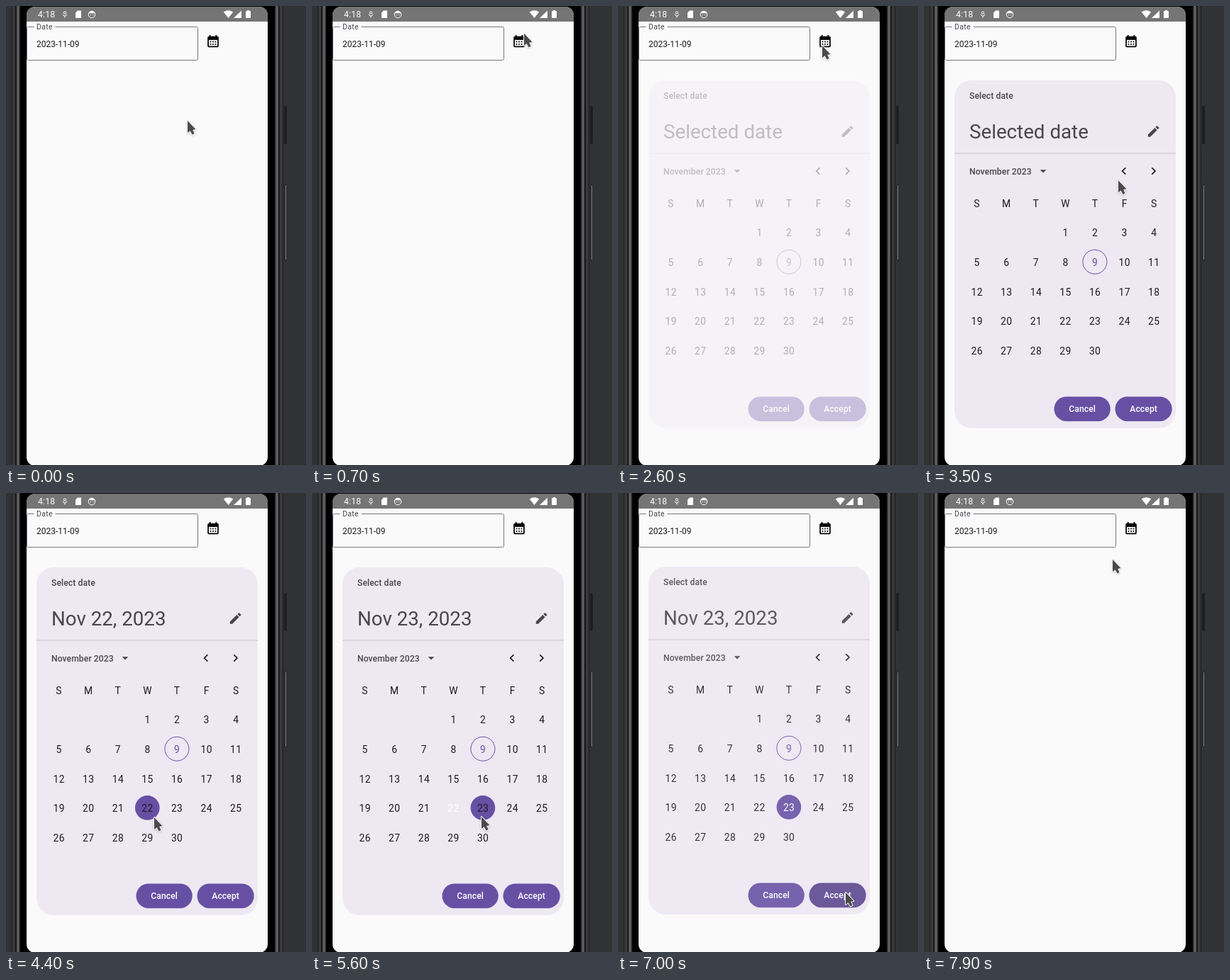
An HTML page with a canvas that plays this animation: 423x648 px, repeating every 8 s.

```html
<!DOCTYPE html>
<html lang="en">
<head>
<meta charset="utf-8">
<title>Date picker</title>
<style>
html, body { margin: 0; width: 100%; height: 100%; overflow: hidden; background: #303234; }
canvas { display: block; width: 423px; height: 648px; }
</style>
</head>
<body>
<canvas id="stage" width="423" height="648"></canvas>
<script>
const W = 423, H = 648, LOOP = 8000, STEP = 100;
const DP = 0.8667, CELL = 48 * DP;
const PURPLE = '#6750a4', INK = '#1c1b1f', MUTED = '#49454f', PAPER = '#fafafa';
const TAP = { open: 1700, first: 4400, second: 5600, accept: 6800 };

const stage = document.getElementById('stage').getContext('2d');
const layer = document.createElement('canvas');
layer.width = W;
layer.height = H;
const sheet = layer.getContext('2d');

const ARROW = new Path2D('M0 0V17L3.6 14.2 6.6 19.6 9.6 18 7.2 13 11.4 12Z');
const PENCIL = new Path2D('M3 17.2V21H6.8L17.8 9.9 14.1 6.2ZM20.7 7a1 1 0 0 0 0-1.4L18.4 3.3a1 1 0 0 0-1.4 0L15.1 5.1 18.9 8.9Z');

const clamp = k => Math.min(1, Math.max(0, k));
const smooth = k => k * k * (3 - 2 * k);
const easeOut = k => 1 - (1 - k) ** 3;
const bend = (a, b, c, k) => a * (1 - k) ** 2 + 2 * b * k * (1 - k) + c * k * k;

// Each move bends from the last resting place, past `via`, to `to`
const REST = [256, 162];
const MOVES = [
  { at: 0, end: 900, via: [340, -30], to: [288, 56], ease: smooth },
  { at: 3400, end: 4000, via: [288, 300], to: [209, 458], ease: easeOut },
  { at: 4400, end: 5100, via: [224, 460], to: [239, 457], ease: smooth },
  { at: 5600, end: 6300, via: [335, 690], to: [321, 564], ease: smooth },
  { at: 7500, end: 7900, via: [330, 330], to: [266, 94], ease: smooth }
];

function pointer(t) {
  let pos = REST;
  for (const { at, end, via, to, ease } of MOVES) {
    if (t < at) break;
    const k = ease(clamp((t - at) / (end - at)));
    pos = pos.map((p, i) => bend(p, via[i], to[i], k));
  }
  return pos;
}

function text(c, str, x, y, size, color, { weight = 400, gap = 0, align = 'left' } = {}) {
  c.font = `${weight} ${size}px Roboto, sans-serif`;
  c.letterSpacing = gap + 'px';
  c.textAlign = align;
  c.fillStyle = color;
  c.fillText(str, x, y);
}

function rect(c, x, y, w, h, color, r = 0) {
  c.fillStyle = color;
  c.beginPath();
  c.roundRect(x, y, w, h, r);
  c.fill();
}

function disc(c, x, y, r, fill, line) {
  c.beginPath();
  c.arc(x, y, r, 0, Math.PI * 2);
  if (fill) {
    c.fillStyle = fill;
    c.fill();
  }
  if (line) {
    c.strokeStyle = line;
    c.stroke();
  }
}

// Runs `paint` on a 24-unit grid centred on x, y
function icon(c, x, y, color, paint) {
  c.save();
  c.translate(x, y);
  c.scale(DP, DP);
  c.translate(-12, -12);
  c.fillStyle = c.strokeStyle = color;
  c.lineWidth = 2;
  paint(c);
  c.restore();
}

function calendar(c) {
  c.beginPath();
  c.roundRect(4, 5, 16, 16, 1);
  c.stroke();
  c.fillRect(4, 5, 16, 5);
  for (const x of [6, 16]) c.fillRect(x, 2, 2, 3);
  for (let i = 0; i < 6; i++) c.fillRect(7 + 4 * (i % 3), 12 + 4 * Math.floor(i / 3), 2, 2);
}

const chevron = dir => c => {
  c.beginPath();
  c.moveTo(12 - 2.7 * dir, 6.7);
  c.lineTo(12 + 2.7 * dir, 12);
  c.lineTo(12 - 2.7 * dir, 17.3);
  c.stroke();
};

function drawPhone(c) {
  rect(c, 0, 0, W, H, '#303234');
  // Symmetric bezel, nested from the outside in
  const rings = { 8: '#1b1b1c', 9: '#39383b', 13: '#171718', 15: '#5a595e', 19: '#111', 21: '#000' };
  for (const x in rings) rect(c, +x, 0, 399 - 2 * x, H, rings[x]);
  rect(c, 392, 141, 4, 54, '#1d1e1f', 2);
  rect(c, 393, 252, 2.5, 107, '#1d1e1f', 1);
  rect(c, 394, 253, 1, 105, '#8c8e8f');
  rect(c, 29, 1, 340, H, PAPER, 12);
  rect(c, 29, 1, 340, 21, '#757575', [12, 12, 0, 0]);
}

function drawStatus(c) {
  text(c, '4:18', 45, 16, 12.2, '#fff', { gap: 0.2 });
  c.lineWidth = 1;
  disc(c, 83, 9.5, 1.7, null, '#fff');
  c.beginPath();
  c.arc(83, 11, 3, 0.2, Math.PI - 0.2);
  c.moveTo(83, 14);
  c.lineTo(83, 16.5);
  c.stroke();
  disc(c, 121, 12, 4.8, null, '#fff');
  c.fillStyle = '#fff';
  c.beginPath();
  c.arc(121, 12, 4.8, Math.PI * 1.12, Math.PI * 1.88);
  c.fill();
  for (const x of [118.7, 122.2]) c.fillRect(x, 12, 1.2, 1.2);
  c.fill(new Path2D('M101 6.5H106V17H98V9.5Z'));
  c.fill(new Path2D('M313.5 17L306.8 8.5Q313.5 3.8 320.2 8.5Z'));
  c.fill(new Path2D('M321 17H332V6.5Z'));
  rect(c, 338, 7, 7, 10, '#fff', 1);
  rect(c, 340, 6, 3, 1.5, '#fff');
}

function drawField(c) {
  c.strokeStyle = '#79747e';
  c.lineWidth = 1;
  c.beginPath();
  c.roundRect(29.5, 29.5, 241, 47, 2);
  c.stroke();
  rect(c, 39.5, 28, 30, 4, PAPER);
  text(c, 'Date', 43, 33, 10.4, MUTED, { gap: 0.35 });
  text(c, '2023-11-09', 43, 58, 12, INK);
  icon(c, 292, 49.6, '#000', calendar);
}

function drawRipple(c) {
  const glow = c.createRadialGradient(292, 49.5, 8, 292, 49.5, 17);
  glow.addColorStop(0, 'rgba(0,0,0,.05)');
  glow.addColorStop(1, 'rgba(0,0,0,0)');
  disc(c, 292, 49.5, 17, glow);
}

function drawButton(c, label, x, w, pressed) {
  rect(c, x, 551.5, w, 34.7, PURPLE, 17.35);
  if (pressed) rect(c, x, 551.5, w, 34.7, 'rgba(0,0,0,.13)', 17.35);
  text(c, label, x + w / 2, 573.2, 12.13, '#fff', { weight: 500, gap: 0.09, align: 'center' });
}

const pickedDay = t => t >= TAP.second ? 23 : t >= TAP.first ? 22 : 0;

function drawCell(c, label, col, row, color) {
  text(c, label, 74.7 + CELL * col, 283.7 + CELL * row, 13.87, color, { gap: 0.43, align: 'center' });
}

function drawMonth(c, t) {
  [...'SMTWTFS'].forEach((name, col) => drawCell(c, name, col, 0, INK));
  const picked = pickedDay(t);
  const lit = pickedDay(t - STEP); // the label colour trails the circle
  c.lineWidth = 1;
  for (let day = 1; day <= 30; day++) {
    const col = (day + 2) % 7, row = 1 + Math.floor((day + 2) / 7);
    const x = 74.5 + CELL * col, y = 278 + CELL * row;
    if (day === 9) disc(c, x, y, 17, null, PURPLE);
    if (day === picked) disc(c, x, y, 20 * DP, PURPLE);
    drawCell(c, day, col, row, day === lit ? '#fff' : day === 9 ? PURPLE : INK);
  }
}

function drawSheet(c, t) {
  const label = { weight: 500, gap: 0.09 };
  const picked = pickedDay(t);
  c.clearRect(0, 0, W, H);
  rect(c, 43, 105, 312, 491, '#eee8f3', 28 * DP);
  text(c, 'Select date', 64, 131.3, 12.13, MUTED, label);
  text(c, picked ? `Nov ${picked}, 2023` : 'Selected date', 64, 187.4, 27.73, MUTED);
  icon(c, 323.6, 177, MUTED, g => g.fill(PENCIL));
  rect(c, 43, 207.6, 312, 1, '#cac4d0');
  text(c, 'November 2023', 64, 237.6, 12.13, MUTED, label);
  icon(c, 168, 233, MUTED, g => g.fill(new Path2D('M7 10H17L12 15Z')));
  icon(c, 282, 233, INK, chevron(-1));
  icon(c, 323.6, 233, INK, chevron(1));
  drawMonth(c, t);
  drawButton(c, 'Cancel', 183.5, 79.3, false);
  drawButton(c, 'Accept', 269.5, 80.2, t >= TAP.accept);
}

function drawPointer(c, t) {
  c.save();
  c.translate(...pointer(t));
  c.lineJoin = 'round';
  c.shadowColor = 'rgba(0,0,0,.2)';
  c.shadowBlur = 3;
  c.shadowOffsetY = 1;
  c.strokeStyle = '#f4f4f4';
  c.lineWidth = 2;
  c.stroke(ARROW);
  c.shadowColor = 'transparent';
  c.fillStyle = '#4a4a4a';
  c.fill(ARROW);
  c.restore();
}

function draw(t) {
  drawPhone(stage);
  drawStatus(stage);
  if (t === TAP.open) drawRipple(stage);
  drawField(stage);
  const enter = clamp((t - 2500) / 300);
  const leave = clamp((t - 6900) / 300) ** 2;
  if (enter > 0 && leave < 1) {
    drawSheet(sheet, t);
    stage.globalAlpha = enter * (1 - leave);
    stage.drawImage(layer, 0, -Math.ceil(leave * 4));
    stage.globalAlpha = 1;
  }
  drawPointer(stage, t);
}

const start = performance.now();
function tick() {
  const t = (performance.now() - start) % LOOP;
  draw(Math.floor(t / STEP) * STEP);
  requestAnimationFrame(tick);
}
tick();
</script>
</body>
</html>
```
